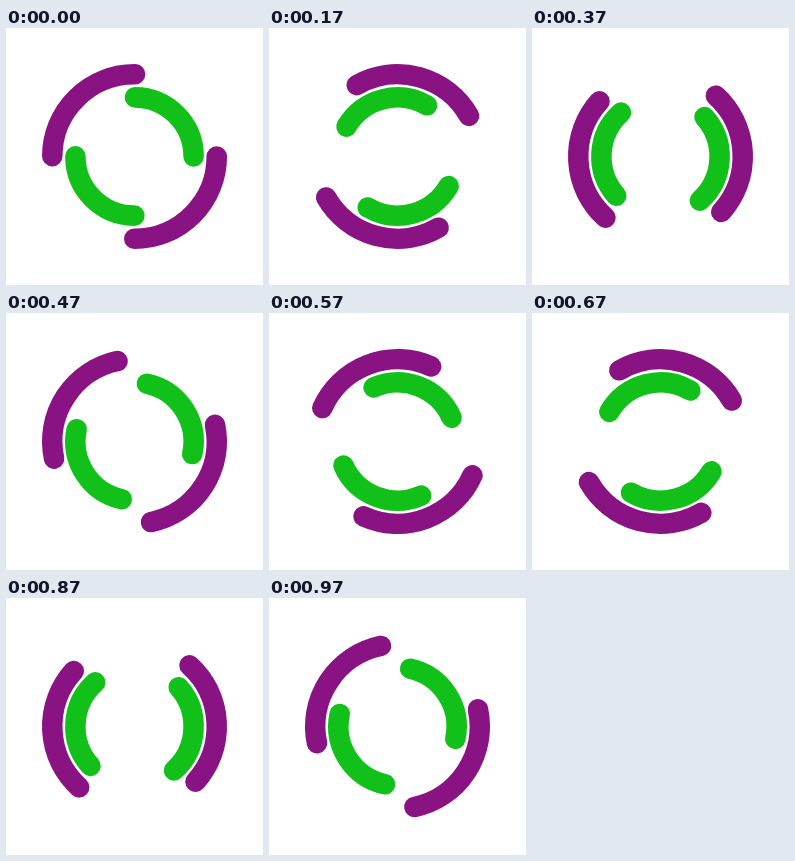
These frames come from a looping animation (257 px wide and 257 px high, 1 s). An HTML page:

```html
<!DOCTYPE html>
<html lang="en">
<head>
<meta charset="utf-8">
<title>Double ring spinner</title>
<style>
  html, body { margin: 0; width: 100%; height: 100%; overflow: hidden; background: #fff; }
  svg { display: block; width: 100%; height: 100%; }
  circle { fill: none; stroke-width: 8; stroke-linecap: round; }
</style>
</head>
<body>
<svg viewBox="-50 -50 100 100">
  <circle id="outer" r="32" stroke="#8a1383" stroke-dasharray="50.265"/>
  <circle id="inner" r="23" stroke="#11c119" stroke-dasharray="36.128" stroke-dashoffset="36.128"/>
</svg>
<script>
  const outer = document.getElementById('outer');
  const inner = document.getElementById('inner');

  // One turn per second in 30 steps, each starting on a multiple of 10 ms.
  function draw() {
    const t = Math.floor(performance.now() % 1000 / 10) * 10;
    const angle = 12 * Math.floor((t + 4) * 0.03);
    outer.setAttribute('transform', `rotate(${angle})`);
    inner.setAttribute('transform', `rotate(${-angle})`);
    requestAnimationFrame(draw);
  }
  draw();
</script>
</body>
</html>
```
